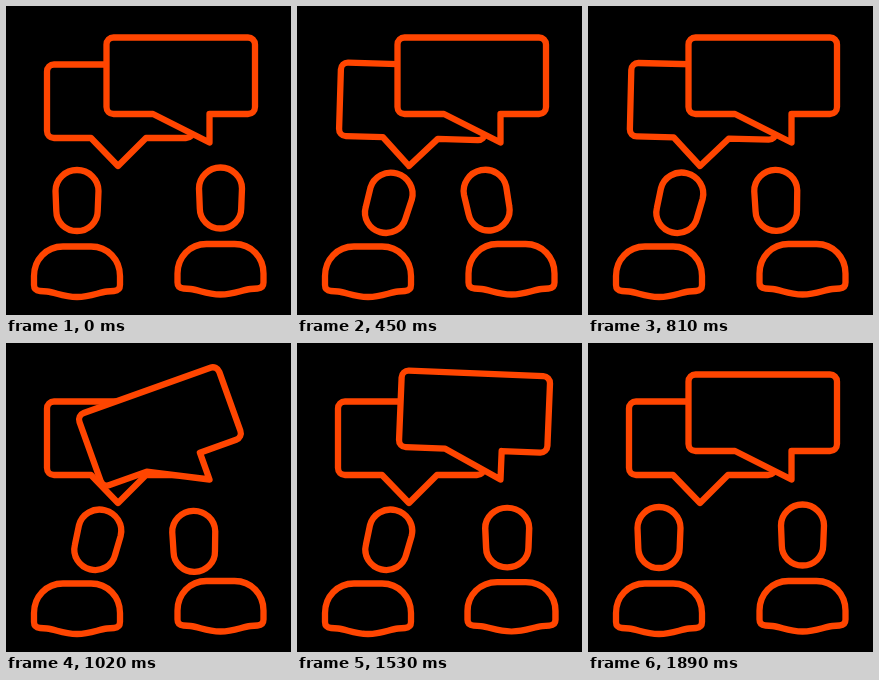
Animation of 285x309 px, one loop 3920 ms. Source, as an HTML page:

```html
<!DOCTYPE html>
<html lang="en">
<head>
<meta charset="utf-8">
<title>Conversation</title>
<style>
  html, body { margin: 0; width: 100%; height: 100%; overflow: hidden; background: #000; }
  svg { display: block; width: 100%; height: 100%; }
  path { fill: #000; stroke: #ff4500; stroke-width: 6.3; stroke-linejoin: round; }
  .person path { fill: none; }
</style>
</head>
<body>
<svg viewBox="0 0 285 309">
  <defs>
    <path id="head" d="M-21.5 -9.5a21.5 21 0 0 1 43 0l-.8 20a20.7 20 0 0 1 -41.4 0Z"/>
    <path id="body" d="M-14 -50.5H14C31 -50.5 43 -37 43 -21V-12Q43 -6.5 37 -6L30 -5.5C21 -4.5 14 0 0 0S-21 -4.5 -30 -5.5L-37 -6Q-43 -6.5 -43 -12V-21C-43 -37 -31 -50.5 -14 -50.5Z"/>
  </defs>
  <path id="bubbleLeft"/>
  <path id="bubbleRight"/>
  <g id="personLeft" class="person"><use id="headLeft" href="#head"/><use href="#body"/></g>
  <g id="personRight" class="person"><use id="headRight" href="#head"/><use href="#body"/></g>
</svg>
<script>
const LOOP = 3920, STEP = 30, HEAD_HEIGHT = 96.5;

// Successive swing angles, one per beat.
const SWING = [0, -19.7, 14, -9.5, 3, 0], BEAT = 179;

const speakers = [
  {
    side: "Left", x: 71, floor: 291, enter: 0, leave: 1530,
    reach: 20.5, tilt: 14, sway: 4, speakAt: 0,
    tip: [112, 160], box: [41, 58.5, 187, 132], tail: [85, 140],
  },
  {
    side: "Right", x: 214.5, floor: 288.5, enter: 120, leave: 1330,
    reach: -26.5, tilt: -1.5, sway: -10, speakAt: 840,
    tip: [203.5, 136.5], box: [100.5, 31.5, 249, 108], tail: [147, 203.5],
  },
];

const clamp01 = v => Math.min(1, Math.max(0, v));
const progress = (time, start, length) => clamp01((time - start) / length);
const ease = p => (1 - Math.cos(Math.PI * p)) / 2;
const hump = p => Math.sin(Math.PI * p) ** 2;

function swingAt(time) {
  const beat = clamp01(time / BEAT / (SWING.length - 1)) * (SWING.length - 1);
  const i = Math.min(Math.floor(beat), SWING.length - 2);
  return SWING[i] + (SWING[i + 1] - SWING[i]) * ease(beat - i);
}

function bubblePath({ box: [left, top, right, bottom], tail, tip }, r = 7) {
  const corner = (dx, dy) => `a${r} ${r} 0 0 1 ${dx * r} ${dy * r}`;
  return `M${left + r} ${top}H${right - r}${corner(1, 1)}V${bottom - r}${corner(-1, 1)}`
    + `H${tail[1]}L${tip}L${tail[0]} ${bottom}H${left + r}${corner(-1, -1)}V${top + r}${corner(1, -1)}Z`;
}

function setAttr(id, name, value) {
  document.getElementById(id).setAttribute(name, value);
}

function draw(now) {
  const time = Math.floor(now % LOOP / STEP) * STEP;
  for (const s of speakers) {
    const lean = ease(progress(time, s.enter, 400)) - ease(progress(time, s.leave, 270));
    const squash = 0.065 * (hump(progress(time, s.enter, 270)) + hump(progress(time, s.leave, 250)));
    const nod = 4 * hump(progress(time, s.speakAt, 2 * BEAT));
    const turn = s.tilt * lean + s.sway * hump(progress(time, s.enter, 600));

    setAttr("bubble" + s.side, "transform", `rotate(${swingAt(time - s.speakAt)} ${s.tip})`);
    setAttr("person" + s.side, "transform", `translate(${s.x} ${s.floor}) scale(${1 + squash} ${1 - squash})`);
    setAttr("head" + s.side, "transform",
      `translate(${s.reach * lean} ${2.3 * lean + nod - HEAD_HEIGHT}) rotate(${turn})`);
  }
}

for (const s of speakers) setAttr("bubble" + s.side, "d", bubblePath(s));

let start;
function tick(now) {
  start ??= now;
  draw(now - start);
  requestAnimationFrame(tick);
}
draw(0);
requestAnimationFrame(tick);
</script>
</body>
</html>
```
